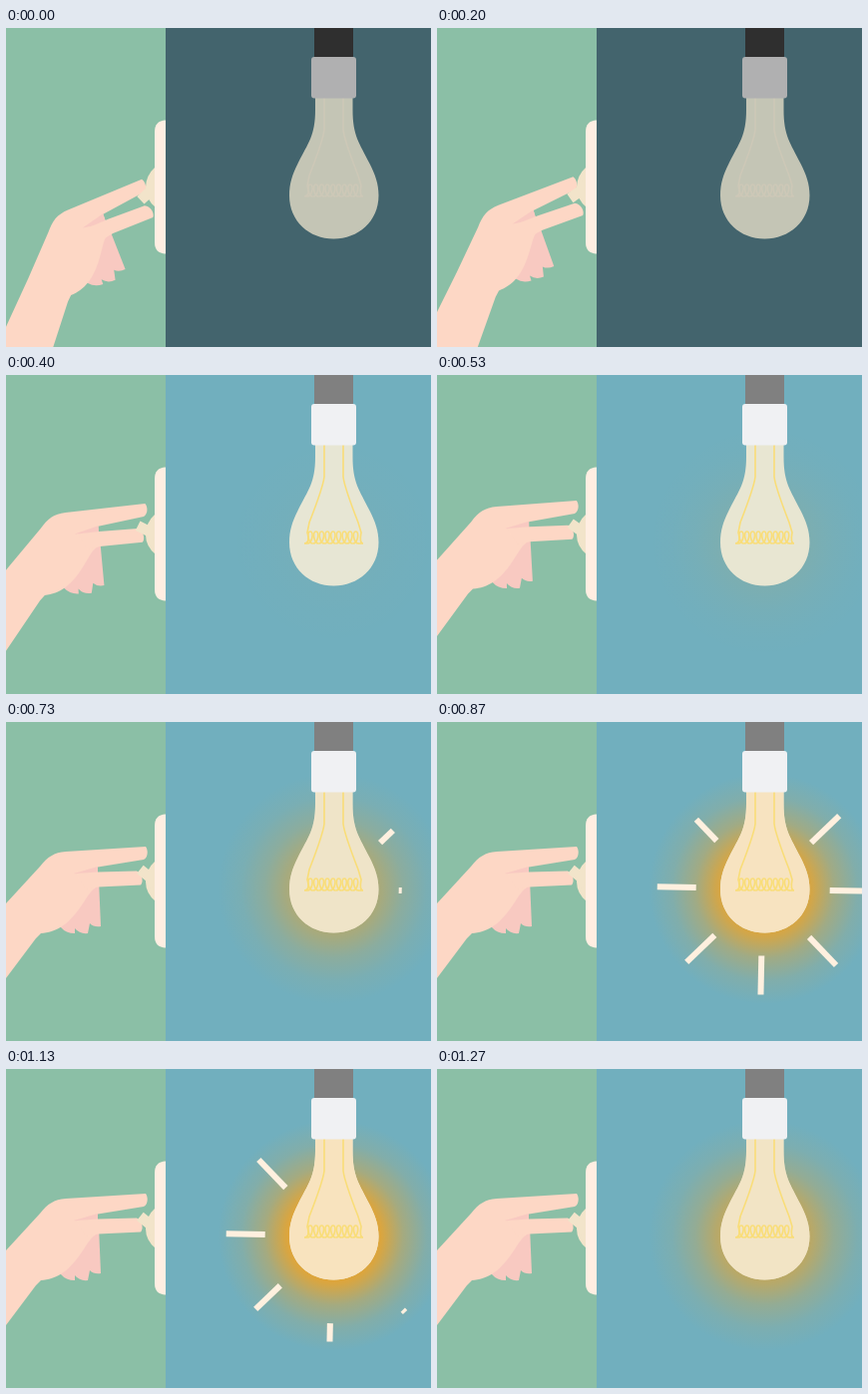
Recreate the animation shown at these times as an HTML page without scripts. Size 426x320 px, loop 1340 ms.

```html
<!DOCTYPE html>
<html lang="en">
<head>
<meta charset="utf-8">
<title>Light switch</title>
<style>
  @property --t { syntax: "<number>"; inherits: true; initial-value: 0; }
  @property --press { syntax: "<number>"; inherits: true; initial-value: 1; }

  html, body { margin: 0; width: 100%; height: 100%; overflow: hidden; }

  svg {
    display: block; width: 100%; height: 100%;
    animation: clock 1340ms steps(20) -4ms infinite,
               press 1340ms step-end -4ms infinite;
  }
  /* --t counts 67 ms ticks; --press runs from 1 (raised hand at rest) to 0 (switched on) */
  @keyframes clock { to { --t: 20; } }
  @keyframes press {
    0% { --press: 1; }
    5% { --press: .99; }
    10% { --press: .965; }
    15% { --press: .91; }
    20% { --press: .7; }
    25% { --press: .42; }
    30% { --press: .15; }
    35% { --press: .04; }
    40%, 100% { --press: 0; }
  }

  .scene {
    --on: clamp(0, var(--t) - 5, 1);
    --glow: calc(var(--on) * (.5 - .5 * cos((var(--t) - 5) * 18deg)));
  }
  .lit { fill: color-mix(in srgb, var(--bright) calc(var(--on) * 100%), var(--dim)); }
  .wall { --dim: #43646d; --bright: #71afbe; }
  .cord { --dim: #2f2f2f; --bright: #808080; }
  .collar { --dim: #b0b0b1; --bright: #f0f1f3; }
  .glass { --dim: #c4c5b5; --bright: #e6e5d4; }
  .warm { fill: #f9e4be; }
  .halo, .warm { opacity: var(--glow); }
  .filament {
    fill: none; stroke-width: 1.6;
    stroke: color-mix(in srgb, #f9dd78 calc(var(--on) * 100%), #cdc8b7);
  }

  .skin { fill: #fdd7c5; }
  .shade { fill: #f8c9c1; }
  .hand {
    transform-origin: 141px 131px;
    transform: translate(calc(-2px * var(--press)), calc(26px * var(--press)))
               rotate(calc(-19deg * var(--press)));
  }
  .lower { transform: translate(calc(3px * var(--press)), calc(1.5px * var(--press))); }
  .knob { fill: #f2e4ca; }
  .lever {
    transform-origin: 149px 160px;
    transform: rotate(calc(39deg - 82deg * var(--press)));
  }

  .rays { transform: translate(326.7px, 167.5px) rotate(1.2deg); fill: #fff0df; }
  .rays rect {
    --age: calc(var(--t) * .67 - 6.23 - .3 * var(--i));
    --in: clamp(0, var(--age), 1);
    --out: clamp(0, var(--age) - 3.07, 1);
    --head: calc(var(--in) * var(--in) * (3 - 2 * var(--in)));
    --tail: calc(var(--out) * var(--out) * (3 - 2 * var(--out)));
    y: -3px; width: 39px; height: 6px;
    transform: rotate(calc(45deg * var(--i) - 45deg))
               translateX(calc(67px + 39px * var(--tail)))
               scaleX(calc(var(--head) - var(--tail)));
  }
</style>
</head>
<body>
<svg viewBox="0 0 426 320" preserveAspectRatio="none">
  <defs>
    <radialGradient id="halo">
      <stop offset=".33" stop-color="#f5a31f" stop-opacity=".95"/>
      <stop offset=".42" stop-color="#f5a31f" stop-opacity=".8"/>
      <stop offset=".6" stop-color="#f5a31f" stop-opacity=".4"/>
      <stop offset=".8" stop-color="#f5a31f" stop-opacity=".13"/>
      <stop offset="1" stop-color="#f5a31f" stop-opacity="0"/>
    </radialGradient>
    <path id="bulb" d="M310 68V82C310 108 303 115 292.500 136C287 147 284 156 284 168C284 194 304 211.500 328.500 211.500S373.500 194 373.500 168C373.500 156 370 147 364.500 136C354 115 347.500 108 347.500 82V68Z"/>
    <path id="coil" d="M302 169c5 0 7-12 3-12s-2 12 2.700 12"/>
    <clipPath id="room"><rect x="160" width="266" height="320"/></clipPath>
  </defs>

  <g class="scene">
    <rect width="160" height="320" fill="#8bbfa6"/>
    <g class="hand">
      <path class="shade" d="M93 158L95 205Q88 206 84 202L82 212Q74 213 69 207V212Q60 212 55 206L45 200 70 165Z"/>
      <path class="skin" d="M-120 308L0 182 34 145C42 135 48 131 60 130L140 125C143 129 142 136 138 138L92 145.500V165C85 168 82 175 75 185C62 204 50 211 35 212L30 217-100 390Z"/>
      <path class="shade" d="M68 152L92 145V155Z"/>
      <path class="skin lower" d="M70 152L92 150.500 131 149.500C137 152 138 161 135 163.500L92 165.500 80 168Z"/>
    </g>
    <g class="knob">
      <path d="M150 139Q140 148 140 160T150 180Z"/>
      <path class="lever" d="M150 149L142 154.500H130V165H142L150 171Z"/>
    </g>
    <path fill="#ffeee2" d="M160 92.500Q149 93 149 104V215Q149 226 160 226.500Z"/>

    <g clip-path="url(#room)">
      <rect class="lit wall" x="160" width="266" height="320"/>
      <circle class="halo" cx="328.500" cy="167" r="116" fill="url(#halo)"/>
      <g class="rays">
        <rect style="--i:0"/>
        <rect style="--i:1"/>
        <rect style="--i:2"/>
        <rect style="--i:3"/>
        <rect style="--i:4"/>
        <rect style="--i:5"/>
        <rect style="--i:6"/>
      </g>
      <use href="#bulb" class="lit glass"/>
      <use href="#bulb" class="warm"/>
      <g class="filament">
        <path d="M319 70V102Q318 112 304 148L302 158Q305 169 299 169H302M338 70V102Q339 112 353 148L356 158Q354 169 358 169H353"/>
        <use href="#coil"/>
        <use href="#coil" x="5.700"/>
        <use href="#coil" x="11.400"/>
        <use href="#coil" x="17.100"/>
        <use href="#coil" x="22.800"/>
        <use href="#coil" x="28.500"/>
        <use href="#coil" x="34.200"/>
        <use href="#coil" x="39.900"/>
        <use href="#coil" x="45.600"/>
      </g>
      <rect class="lit cord" x="309" y="-4" width="39" height="36" rx="4"/>
      <rect class="lit collar" x="306" y="29" width="45" height="41.500" rx="3"/>
    </g>
  </g>
</svg>
</body>
</html>
```
